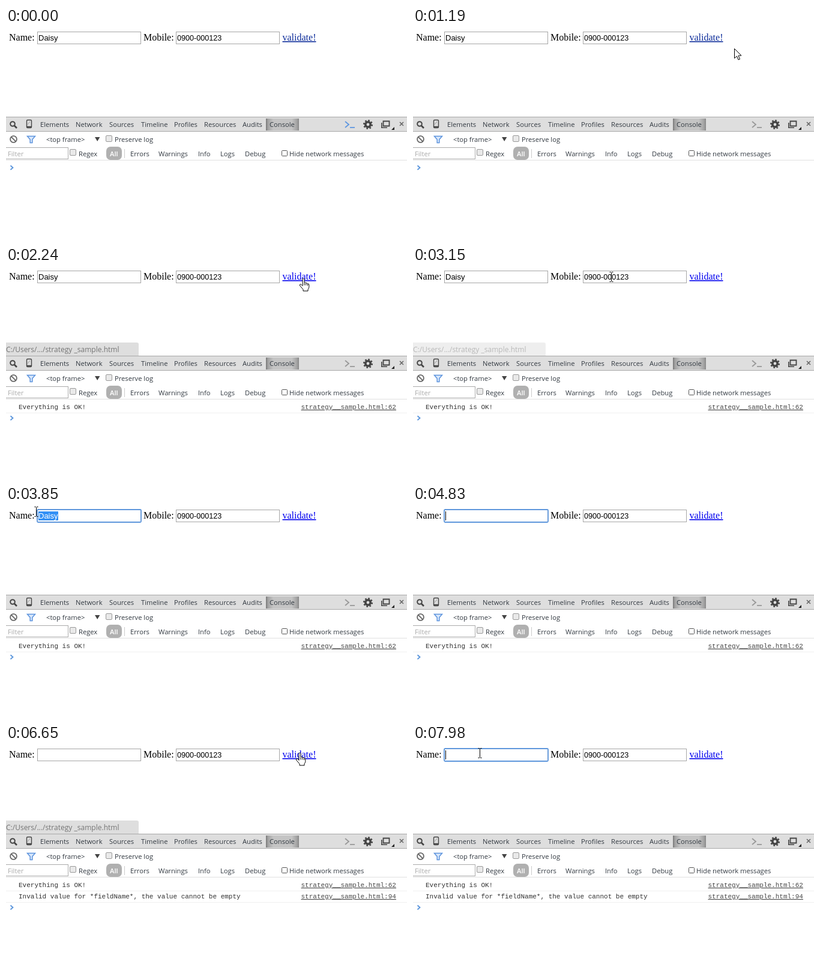
Recreate the animation shown at these times as an HTML page. Size 668x352 px, loop 8000 ms.

```html
<!DOCTYPE html>
<html lang="en">
<head>
<meta charset="utf-8">
<title>Form validation in the console</title>
<style>
  html, body { margin: 0; width: 100%; height: 100%; overflow: hidden; background: #fff; }
  svg { display: block; }
  text { white-space: pre; }
  .page { font: 16px "Liberation Serif", serif; }
  .field { font: 13px "Liberation Sans", sans-serif; }
  .ui { font: 11.2px "Open Sans", sans-serif; fill: #333a42; }
  .log { font: 11px "Liberation Mono", monospace; fill: #303030; }
  .src { text-decoration: underline; fill: #484848; }
  .line { fill: none; stroke: #444; }
</style>
</head>
<body>
<svg width="668" height="352">
  <defs>
    <linearGradient id="tab">
      <stop offset="0" stop-color="#777"/>
      <stop offset=".06" stop-color="#a2a2a2"/>
      <stop offset=".22" stop-color="#c4c4c4"/>
      <stop offset=".78" stop-color="#c4c4c4"/>
      <stop offset=".94" stop-color="#a2a2a2"/>
      <stop offset="1" stop-color="#888"/>
    </linearGradient>
    <clipPath id="picked"><rect id="pick" y="9" height="15"/></clipPath>
  </defs>

  <g class="page">
    <text x="5" y="21">Name:</text>
    <text x="229" y="21">Mobile:</text>
    <text id="link" x="460.5" y="21" text-decoration="underline">validate!</text>
  </g>
  <g fill="#fff" stroke="#a6a6a6">
    <rect x="52.5" y="6.5" width="172" height="20"/>
    <rect x="283.5" y="6.5" width="172" height="20"/>
  </g>
  <rect id="focus" x="52" y="6" width="173" height="21" rx="1.5" fill="none" stroke="#5f97dc" stroke-width="1.8"/>
  <g class="field">
    <text id="name" x="54" y="21">Daisy</text>
    <g id="selection" clip-path="url(#picked)">
      <rect x="54" y="9" width="33" height="15" fill="#3390f5"/>
      <text x="54" y="21" fill="#fff">Daisy</text>
    </g>
    <text x="285" y="21" style="font-size:12.6px">0900-000123</text>
  </g>
  <path id="caret" d="M54.5 9V24" stroke="#000"/>

  <g id="status">
    <path d="M0 126H218Q221 126 221 129V149H0Z" fill="#dedede"/>
    <text class="ui" x="0" y="142" style="font-size:12px;fill:#747474">C:/Users/.../strategy _sample.html</text>
  </g>

  <path d="M0 148H668V173H0Z" fill="#dedede"/>
  <path d="M0 148.5H668M0 172.5H668" stroke="#a8a8a8"/>
  <rect x="433" y="151" width="55" height="20" fill="url(#tab)"/>
  <g class="ui" id="labels"></g>

  <g class="line">
    <circle cx="11" cy="160" r="3.8" stroke-width="2"/>
    <path d="M14 163L18 167" stroke-width="2.6"/>
    <rect x="34.5" y="153.5" width="8" height="13" rx="1.5" stroke-width="1.4"/>
    <path d="M35 164.8H42" stroke-width="2"/>
    <path d="M36 161L40 156" stroke="#999"/>
    <circle cx="603" cy="161" r="4.2" stroke-width="3.6"/>
    <circle cx="603" cy="161" r="6.8" stroke-width="2.4" stroke-dasharray="2.67"/>
    <path d="M628.5 155.5H638.5V163.5H628.5Z" stroke-width="1.8"/>
    <path d="M625.8 158V166.2H635" stroke-width="1.6"/>
    <path d="M656 157L662 163M662 157L656 163" stroke-width="1.6" stroke="#666"/>
    <path d="M647 165V170H642Z" fill="#222" stroke="none"/>
    <circle cx="12.5" cy="185.5" r="5.4" stroke="#666" stroke-width="1.8"/>
    <path d="M8.7 181.7L16.3 189.3" stroke="#666" stroke-width="1.8"/>
    <path d="M35.5 180.5H48.5L43.8 186V191.5H40.2V186Z" stroke="#5c93dd" stroke-width="1.5" fill="#d9e8fb"/>
    <path d="M148 182H156.400L152.200 189Z" fill="#444" stroke="none"/>
  </g>
  <g id="prompt" fill="none" stroke-width="1.8">
    <path d="M565 156L571 161L565 166"/>
    <path d="M573 166H581"/>
  </g>

  <g fill="#e9e9e9" stroke="#999">
    <rect x="166.500" y="179.500" width="10" height="10" rx="1.500"/>
    <rect x="106.500" y="202.500" width="10" height="10" rx="1.500"/>
    <rect x="459.500" y="204.500" width="9" height="9" rx="1" fill="#fff" stroke="#555"/>
    <rect x="-.5" y="199.500" width="104" height="19" fill="#fff" stroke="#aaa"/>
  </g>
  <text class="ui" x="3" y="214" style="fill:#aaa">Filter</text>
  <rect x="167" y="198" width="26" height="22" rx="7" fill="#b0b0b0"/>
  <text class="ui" x="173" y="214" style="fill:#fff;font-weight:600">All</text>
  <path d="M197.500 202V217" stroke="#ccc"/>
  <path d="M0 220.500H668" stroke="#e0e0e0"/>

  <g class="log">
    <g id="log1">
      <text x="21" y="237">Everything is OK!</text>
      <text class="src" x="491.5" y="237">strategy__sample.html:62</text>
      <path d="M0 243.500H668" stroke="#f0f0f0"/>
    </g>
    <g id="log2">
      <text x="21" y="256">Invalid value for *fieldName*, the value cannot be empty</text>
      <text class="src" x="491.5" y="256">strategy__sample.html:94</text>
      <path d="M0 262.500H668" stroke="#f0f0f0"/>
    </g>
  </g>
  <path id="chevron" d="M7.500 229.500L11.500 233L7.500 236.500" fill="none" stroke="#5a95dc" stroke-width="1.8"/>

  <g id="pointer" stroke="#000" fill="#fff">
    <path id="arrow" d="M0 0V16L4 12.500L6.500 18.500L9 17.500L6.500 11.500H11.500Z"/>
    <g id="hand" transform="translate(-6)">
      <path d="M5.500 13V2Q5.500 .5 7 .5T8.500 2V7.500Q10.500 6.500 11.300 8.500Q13.300 7.500 14 9.500Q16.300 9 16.300 11.500V15Q16 17 14.500 19V21.500H6.500V19L1 12.500Q.5 10 2.500 10Z"/>
      <path d="M8.500 8V12M11.300 9V12M14 10V12.500" fill="none"/>
    </g>
    <path id="beam" fill="none" d="M-3 -8H-1L0 -7L1 -8H3M0 -7V7M-3 8H-1L0 7L1 8H3"/>
  </g>
</svg>
<script>
const LOOP = 8000, STEP = 70;
const el = id => document.getElementById(id);
const show = (id, on) => el(id).style.display = on ? "" : "none";
const within = (t, a, b) => t >= a && t < b;

const labels = [
  [165, { Elements: 57, Network: 116, Sources: 172, Timeline: 225, Profiles: 280,
          Resources: 330, Audits: 394, Console: 439 }],
  [190, { "<top frame>": 67, "Preserve log": 181 }],
  [214, { Regex: 121, Errors: 207, Warnings: 254, Info: 320, Logs: 357, Debug: 398,
          "Hide network messages": 472 }]
];
for (const [y, row] of labels)
  for (const [label, x] of Object.entries(row)) {
    const node = document.createElementNS("http://www.w3.org/2000/svg", "text");
    node.setAttribute("x", x);
    node.setAttribute("y", y);
    node.textContent = label;
    el("labels").append(node);
  }

// Pointer keys: time, x, y
const path = [
  [770, 584, 338], [910, 580, 190], [1050, 562, 85], [1190, 535, 34], [1330, 512, 28], [1540, 494, 18],
  [2870, 494, 18], [2940, 484, 18], [3080, 395, 15], [3290, 200, 19], [3500, 115, 12], [3640, 103, 14],
  [3850, 50, 9], [3990, 40, 13], [4270, 62, 16],
  [5600, 62, 16], [5740, 170, 30], [5880, 400, 48], [5950, 462, 37], [6160, 488, 12],
  [7280, 488, 12], [7420, 440, 15], [7630, 230, 18], [7770, 153, 14], [7840, 130, 13],
  [7910, 130, 13], [7980, 111, 13]
];

function pointerAt(t) {
  const i = path.findIndex(key => key[0] > t);
  if (i < 0) return path[path.length - 1].slice(1);
  if (i === 0) return path[0].slice(1);
  const [t0, x0, y0] = path[i - 1], [t1, x1, y1] = path[i];
  const p = (t - t0) / (t1 - t0);
  return [Math.round(x0 + (x1 - x0) * p), Math.round(y0 + (y1 - y0) * p)];
}

function pointerKind(t, x, y) {
  if (within(t, 3640, 4200)) return "beam";
  if (y < 6 || y > 27) return "arrow";
  if (within(x, 52, 225) || within(x, 283, 456)) return "beam";
  return within(x, 460, 517) ? "hand" : "arrow";
}

// Status bar opacity: each fade has one half-way step
function statusAt(t) {
  for (const [from, to] of [[1610, 3150], [6300, 7630]])
    if (within(t, from, to + STEP))
      return t < from + STEP || t >= to ? 0.5 : 1;
  return 0;
}

function draw(time) {
  const t = Math.floor(time % LOOP / STEP) * STEP;
  const [x, y] = pointerAt(t);
  const kind = pointerKind(t, x, y);

  show("pointer", t >= 770 && !within(t, 4830, 5670));
  for (const id of ["arrow", "hand", "beam"]) show(id, id === kind);
  el("pointer").setAttribute("transform", `translate(${x + 0.5} ${y + 0.5})`);

  const pressed = within(t, 2030, 2240) || within(t, 6580, 6650);
  el("link").setAttribute("fill", pressed ? "#e00" : t < 2030 ? "#0c2c9a" : "#00e");
  el("prompt").setAttribute("stroke", t < 980 ? "#5f97e0" : "#999");

  show("focus", within(t, 3640, 6580) || t >= 7840);
  show("name", t < 4830);
  show("caret", within(t, 4830, 5320) || within(t, 5810, 6300) || t >= 7840);
  show("selection", within(t, 3710, 4830));
  const start = t < 3850 ? Math.min(87, Math.max(54, x)) : 54;
  el("pick").setAttribute("x", start);
  el("pick").setAttribute("width", 87 - start);

  el("status").setAttribute("opacity", statusAt(t));
  const lines = (t >= 2240) + (t >= 6650);
  show("log1", lines > 0);
  show("log2", lines > 1);
  el("chevron").setAttribute("transform", `translate(0 ${lines * 19})`);
}

function tick() {
  draw(performance.now());
  requestAnimationFrame(tick);
}
tick();
</script>
</body>
</html>
```
